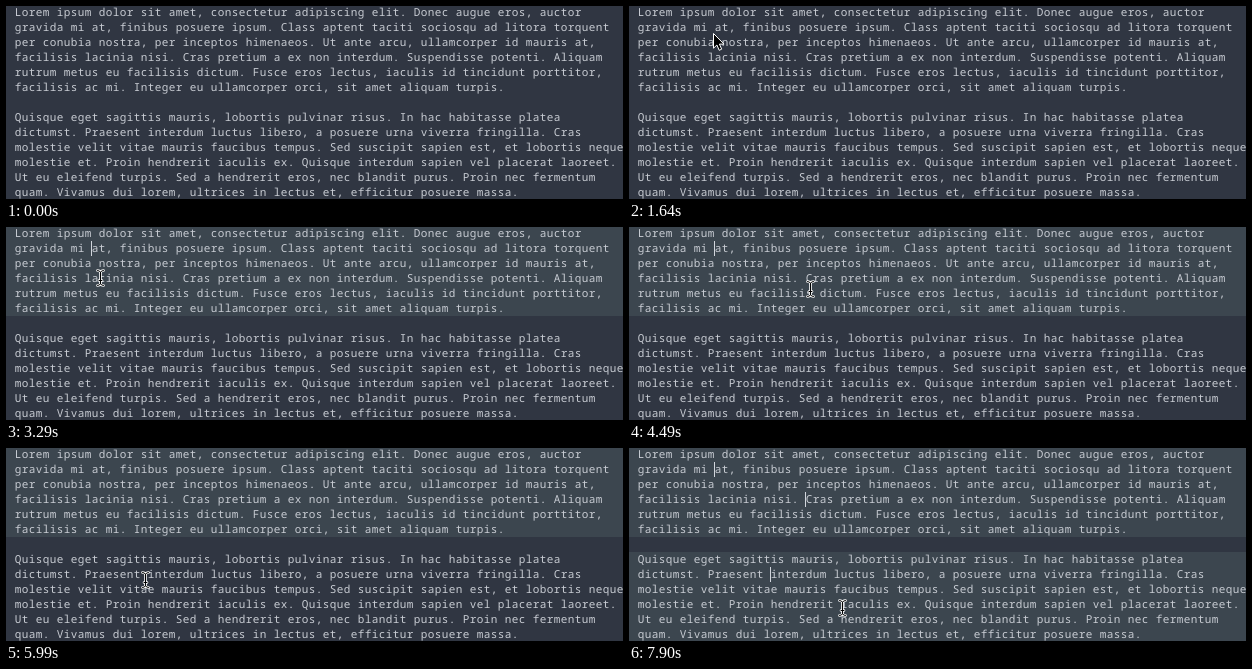
These frames come from a looping animation (617x193 px, 8000 ms). An HTML page:

```html
<!DOCTYPE html>
<html lang="la">
<head>
<meta charset="utf-8">
<title>Multiple carets</title>
<style>
  html, body { margin: 0; width: 100%; height: 100%; overflow: hidden; background: #303642; }
  svg { display: block; }
  text {
    fill: #c8ccd3;
    font: 11px "Noto Sans Mono", "DejaVu Sans Mono", monospace;
    font-variant-ligatures: none;
    letter-spacing: 0.4px;
    text-rendering: geometricPrecision;
  }
  .band { fill: #3c464f; }
  .caret { fill: #d2d6dd; }
</style>
</head>
<body>
<svg width="617" height="193" viewBox="0 0 617 193">
  <defs>
    <path id="beamShape" d="M-3 -7.5Q-0.5 -7.5 0 -5.5Q0.5 -7.5 3 -7.5M0 -5.5V5.5M-3 7.5Q-0.5 7.5 0 5.5Q0.5 7.5 3 7.5M-1.5 2.5H1.5"/>
  </defs>
  <g id="bands"></g>
  <g id="lines"></g>
  <g id="carets"></g>
  <path id="arrow" d="M0 0.5V15.2L3.4 12L5.7 17.3L8.2 16.2L5.9 11.1H10.5Z"
        fill="#000" stroke="#fff" stroke-linejoin="round"/>
  <g id="beam" fill="none" stroke-linecap="round">
    <use href="#beamShape" stroke="#fff" stroke-width="2.6"/>
    <use href="#beamShape" stroke="#000"/>
  </g>
</svg>
<script>
const LOOP = 8000, ROW = 15, TOP = -1, LEFT = 8, ADVANCE = 7;

// The picture changes on a coarse clock; all times below are in its ticks.
const FIRST = 440, TICK = 149.2;

const lines = [
  "Lorem ipsum dolor sit amet, consectetur adipiscing elit. Donec augue eros, auctor",
  "gravida mi at, finibus posuere ipsum. Class aptent taciti sociosqu ad litora torquent",
  "per conubia nostra, per inceptos himenaeos. Ut ante arcu, ullamcorper id mauris at,",
  "facilisis lacinia nisi. Cras pretium a ex non interdum. Suspendisse potenti. Aliquam",
  "rutrum metus eu facilisis dictum. Fusce eros lectus, iaculis id tincidunt porttitor,",
  "facilisis ac mi. Integer eu ullamcorper orci, sit amet aliquam turpis.",
  "",
  "Quisque eget sagittis mauris, lobortis pulvinar risus. In hac habitasse platea",
  "dictumst. Praesent interdum luctus libero, a posuere urna viverra fringilla. Cras",
  "molestie velit vitae mauris faucibus tempus. Sed suscipit sapien est, et lobortis neque",
  "molestie et. Proin hendrerit iaculis ex. Quisque interdum sapien vel placerat laoreet.",
  "Ut eu eleifend turpis. Sed a hendrerit eros, nec blandit purus. Proin nec fermentum",
  "quam. Vivamus dui lorem, ultrices in lectus et, efficitur posuere massa."
];

// Each click puts a caret before a word and lights up its paragraph.
const clicks = [
  { at: 15, row: 1, word: "at," },
  { at: 29, row: 3, word: "Cras" },
  { at: 38, row: 8, word: "interdum" }
];

// The pointer eases from stop to stop and turns into a beam on the way.
const BEAM_AT = 12;
const origin = { x: 75, y: -22 };
const moves = [
  { from: -1, to: 4, x: 87, y: 22 },
  { from: 7, to: 8, x: 84, y: 27 },
  { from: 9, to: 10, x: 83, y: 20 },
  { from: 11, to: 12, x: 87, y: 28 },
  { from: 15, to: 19, x: 94, y: 51 },
  { from: 20, to: 24, x: 148, y: 81 },
  { from: 24, to: 27, x: 181, y: 62 },
  { from: 27, to: 29, x: 178, y: 57 },
  { from: 30, to: 37, x: 139, y: 132 },
  { from: 38, to: 42, x: 219, y: 162 },
  { from: 42, to: 45, x: 255, y: 162 },
  { from: 45, to: 47, x: 213, y: 160 }
];

const $ = id => document.getElementById(id);
const clamp = v => Math.min(1, Math.max(0, v));
const smooth = p => p * p * (3 - 2 * p);
const rowTop = row => TOP + row * ROW;

function add(parent, tag, attrs) {
  const el = document.createElementNS("http://www.w3.org/2000/svg", tag);
  for (const key in attrs) el.setAttribute(key, attrs[key]);
  return $(parent).appendChild(el);
}

lines.forEach((line, row) => {
  add("lines", "text", { x: LEFT + 0.8, y: rowTop(row) + 11 }).textContent = line;
});

const gap = lines.indexOf("");
for (const c of clicks) {
  const below = c.row > gap;
  const first = below ? gap + 1 : 0, end = below ? lines.length : gap;
  c.band = add("bands", "rect", {
    class: "band", x: 0, y: rowTop(first), width: 617, height: (end - first) * ROW
  });
  c.caret = add("carets", "rect", {
    class: "caret", x: LEFT + lines[c.row].indexOf(c.word) * ADVANCE, y: rowTop(c.row),
    width: 1, height: ROW
  });
}

function pointer(tick) {
  let { x, y } = origin;
  for (const m of moves) {
    const p = smooth(clamp((tick - m.from) / (m.to - m.from)));
    x += (m.x - x) * p;
    y += (m.y - y) * p;
  }
  return [Math.round(x), Math.round(y)];
}

// Blink with soft edges, restarted by each click.
const blink = age => clamp(0.5 + 2 * Math.cos((age - 1.5) * Math.PI / 6));

function draw(time) {
  const tick = Math.floor((time - FIRST) / TICK);
  const beam = tick >= BEAM_AT;
  const [x, y] = pointer(tick);
  $("arrow").style.display = beam ? "none" : "";
  $("beam").style.display = beam ? "" : "none";
  $(beam ? "beam" : "arrow").setAttribute("transform", `translate(${x + 0.5} ${y})`);

  const last = clicks.findLast(c => c.at <= tick);
  for (const c of clicks) {
    const on = c.at <= tick;
    c.band.style.display = on ? "" : "none";
    c.caret.style.opacity = on ? blink(tick - last.at) : 0;
  }
}

const start = performance.now();
function frame() {
  draw((performance.now() - start) % LOOP);
  requestAnimationFrame(frame);
}
frame();
</script>
</body>
</html>
```
